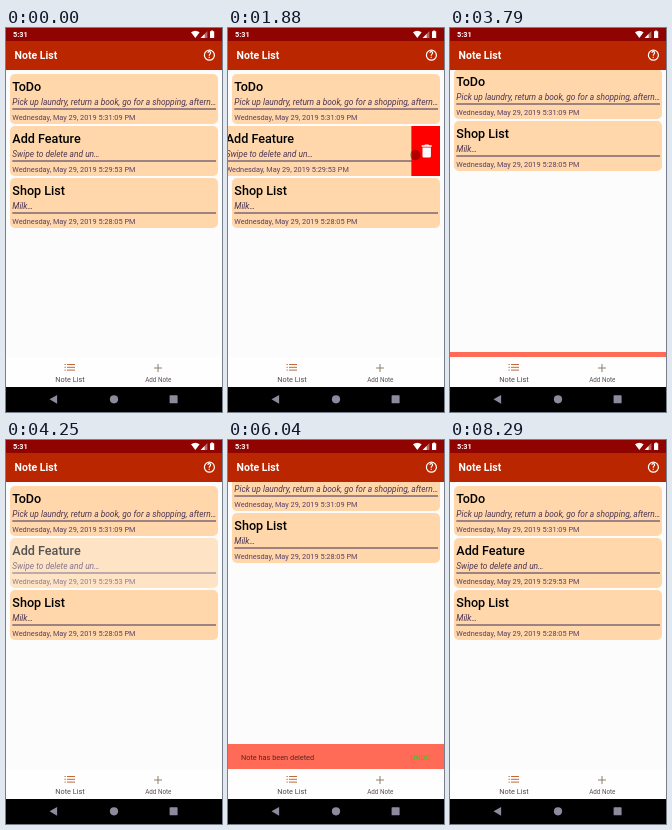
Animation, 216 px wide and 384 px high, one loop 8330 ms. Source, as an HTML page:

```html
<!DOCTYPE html>
<html lang="en">
<head>
<meta charset="utf-8">
<title>Swipe to delete</title>
<style>
  html, body { margin: 0; width: 100%; height: 100%; overflow: hidden; background: #fcfcfc; }
  svg { display: block; width: 100vw; height: 100vh; font: 7.35px Roboto, sans-serif; }
  .medium { font-weight: 500; }
  .bold { font-weight: 700; }
  .card rect { fill: #ffd7aa; }
  .card .title { font-size: 12.6px; font-weight: 500; fill: #000; }
  .card .body { font-size: 8.4px; font-style: italic; fill: #4c3554; }
  .card .date { fill: #573f68; }
  .card path { stroke: #3a3058; }
</style>
</head>
<body>
<svg viewBox="0 0 216 384">
  <rect width="216" height="384" fill="#fcfcfc"/>

  <g id="list">
    <g id="cards"></g>
    <g id="backdrop">
      <rect id="red" y="98" height="50" fill="#f00"/>
      <path id="trash" fill="#fff" d="M-4.2-3.6h8.4v8.6q0 1.4-1.4 1.4h-5.6q-1.4 0-1.4-1.4zM-5-6h2.6l.7-.8h3.4l.7.8H5v1.5H-5z"/>
    </g>
  </g>

  <g id="snackbar">
    <rect y="304" width="216" height="25" fill="#ff6b56"/>
    <g id="snackText">
      <text x="13" y="319.6" fill="#5a2424">Note has been deleted</text>
      <text x="182.5" y="319.6" class="medium" fill="#5cb82c">UNDO</text>
    </g>
  </g>

  <!-- bottom navigation -->
  <rect y="329" width="216" height="30" fill="#fefefe"/>
  <path d="M58.5 336.5h1.3m1.2 0h8M58.5 339.3h1.3m1.2 0h8M58.5 342.1h1.3m1.2 0h8" stroke="#c06a3a"/>
  <path d="M148 340h8M152 336v8" stroke="#85725f" stroke-width=".9"/>
  <text x="64" y="353.6" text-anchor="middle" fill="#54464e">Note List</text>
  <text x="152.3" y="353.6" text-anchor="middle" font-size="6.3" fill="#5c5058">Add Note</text>

  <!-- system navigation -->
  <rect y="359" width="216" height="25" fill="#000"/>
  <g fill="#8c8a9c">
    <path d="M43.5 371.3l7.6-4.4v8.8z"/>
    <circle cx="108" cy="371.3" r="4.1"/>
    <rect x="163.6" y="367.3" width="8" height="8" rx=".6"/>
  </g>

  <!-- status and app bars -->
  <rect y="12" width="216" height="30" fill="#b92600"/>
  <rect width="216" height="13" fill="#8f0300"/>
  <g fill="#fff">
    <text x="7" y="9.4" class="bold">5:31</text>
    <path d="M185 4.3q4.3-3 8.6 0l-4.3 5.6z"/>
    <path d="M194.6 9.9h6.8V3z" opacity=".4"/>
    <path d="M194.6 9.9h4V5.9z"/>
    <path d="M204 3.3h1.2v-.8h1.8v.8h1.2v6.7H204z"/>
    <text x="8.6" y="31.4" class="bold" font-size="10.5">Note List</text>
    <text x="203.4" y="30.2" text-anchor="middle" class="bold" font-size="8.4">?</text>
  </g>
  <circle cx="203.4" cy="27.2" r="5" fill="none" stroke="#fff" stroke-width="1.2"/>

  <circle id="touch" r="5.2" fill="#000" opacity=".3"/>
</svg>

<script>
const LOOP = 8330;
const PITCH = 52;
const SWIPE = 193;
const SNACK_HEIGHT = 25;
// Moment each deletion is committed, and the swipe direction
const deletions = [{ at: 2246, dir: -1 }, { at: 5500, dir: 1 }];
// Offsets from the commit
const SWIPE_START = -420, SWIPE_END = -160, COLLAPSE = 120;
const TAP = 1320, DISMISS = 1419, RESTORE = 1675;

const notes = [
  ['ToDo', 'Pick up laundry, return a book, go for a shopping, aftern…', '5:31:09'],
  ['Add Feature', 'Swipe to delete and un…', '5:29:53'],
  ['Shop List', 'Milk…', '5:28:05'],
];

const $ = id => document.getElementById(id);
$('cards').innerHTML = notes.map(([title, body, time]) => `
  <g class="card">
    <rect x="4" width="208" height="50" rx="5"/>
    <text class="title" x="6.3" y="16.5">${title}</text>
    <text class="body" x="6.3" y="30.8">${body}</text>
    <path d="M6.3 35H210"/>
    <text class="date" x="6.3" y="46.1">Wednesday, May 29, 2019 ${time} PM</text>
  </g>`).join('');
const cards = [...document.querySelectorAll('.card')];

const progress = (t, start, duration) => Math.min(1, Math.max(0, (t - start) / duration));
const accelDecel = p => (1 - Math.cos(Math.PI * p)) / 2;

// cubic-bezier(.4, 0, .2, 1)
function fastOutSlowIn(x) {
  let low = 0, high = 1;
  for (let i = 0; i < 20; i++) {
    const s = (low + high) / 2;
    const bx = 1.2 * s * (1 - s) ** 2 + 0.6 * s * s * (1 - s) + s ** 3;
    if (bx < x) low = s; else high = s;
  }
  return low * low * (3 - 2 * low);
}

const move = (el, x, y) => el.setAttribute('transform', `translate(${x} ${y})`);
const show = (el, visible) => el.setAttribute('visibility', visible ? 'visible' : 'hidden');

function draw(t) {
  const { at, dir } = deletions[t < 4700 ? 0 : 1];
  const u = t - at;

  const drag = SWIPE * progress(u, SWIPE_START, SWIPE_END - SWIPE_START) ** 2;
  const snack = fastOutSlowIn(progress(u, 0, 250)) - fastOutSlowIn(progress(u, DISMISS, 250));
  const lift = Math.round(SNACK_HEIGHT * snack);
  const collapse = accelDecel(progress(u, COLLAPSE, 250)) - accelDecel(progress(u, RESTORE, 250));
  const restored = progress(u, RESTORE + 250, 120);

  move($('list'), 0, -lift);
  move(cards[0], 0, 46);
  move(cards[1], u < 0 ? dir * drag : 0, 46 + PITCH);
  cards[1].setAttribute('opacity', u < 0 ? 1 : restored);
  move(cards[2], 0, 46 + Math.round(PITCH * (2 - collapse)));

  show($('backdrop'), drag > 0 && u < COLLAPSE);
  const width = drag + 20;
  $('red').setAttribute('width', width);
  $('red').setAttribute('x', dir > 0 ? 4 : 212 - width);
  move($('trash'), dir > 0 ? 17.3 : 198.7, 123.2);

  move($('snackbar'), 0, SNACK_HEIGHT - lift);
  show($('snackbar'), lift > 0);
  $('snackText').setAttribute('opacity', progress(u, 70, 180) - progress(u, DISMISS, 120));

  const swiping = u >= SWIPE_START && u < 0;
  const tapping = u >= TAP && u < DISMISS;
  show($('touch'), swiping || tapping);
  if (swiping) move($('touch'), dir > 0 ? 20 + drag : 196 - drag, 127);
  else move($('touch'), 193, 317);
}

function tick() {
  draw((performance.now() - start) % LOOP);
  requestAnimationFrame(tick);
}
const start = performance.now();
tick();
</script>
</body>
</html>
```
